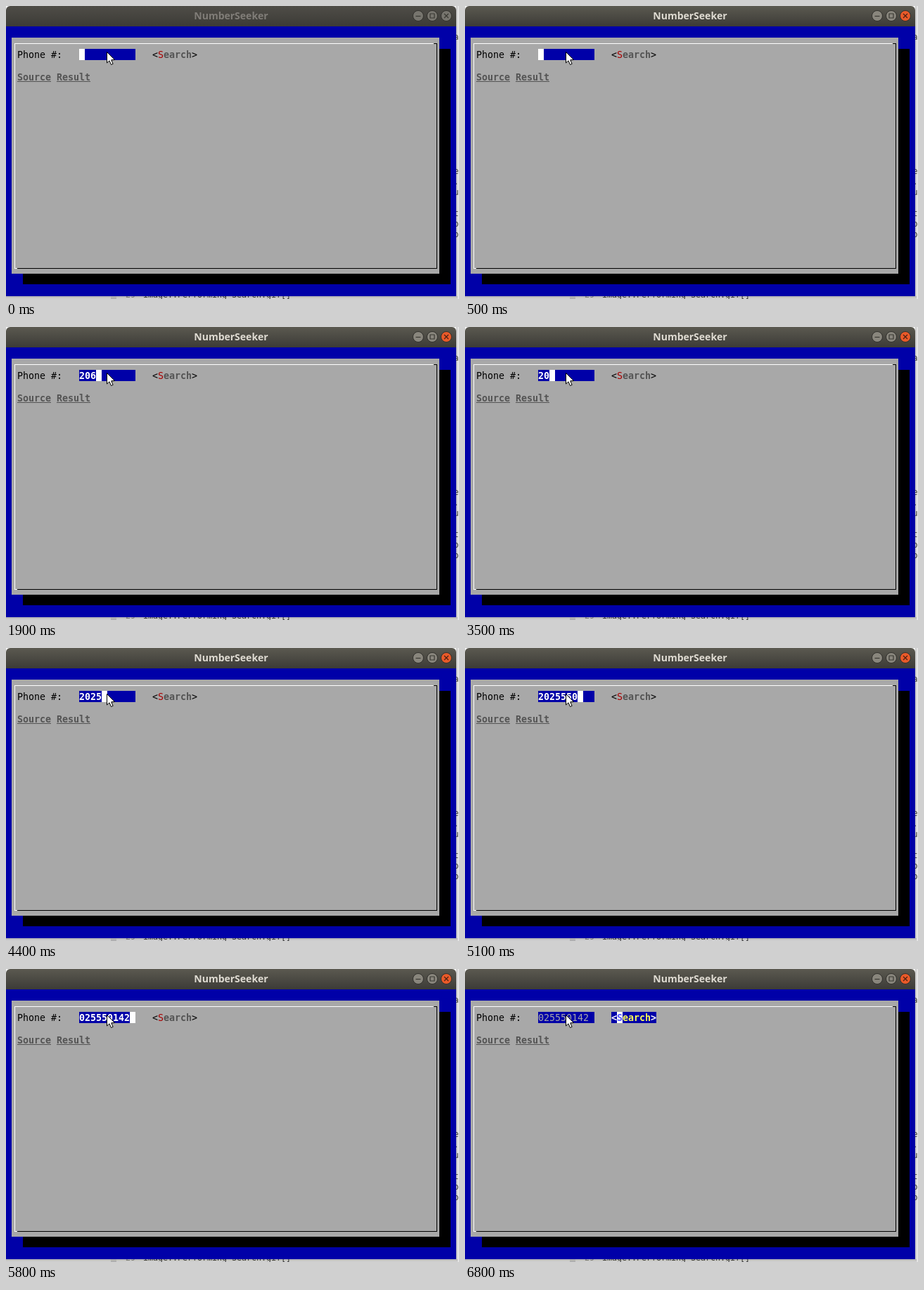
An HTML page with a canvas that plays this animation: 644x417 px, repeating every 8 s.

```html
<!DOCTYPE html>
<html lang="en">
<head>
<meta charset="utf-8">
<title>NumberSeeker</title>
<style>
html, body { margin: 0; width: 100%; height: 100%; overflow: hidden; background: #fff; }
canvas { display: block; }
</style>
</head>
<body>
<canvas id="stage" width="644" height="417"></canvas>
<script>
const ctx = document.getElementById('stage').getContext('2d');
const LOOP = 8000, FOCUS_WINDOW = 500, FOCUS_BUTTON = 6800;
const CELL_W = 8, CELL_H = 16, TOP = 29, FIELD_COL = 13, FIELD_LEN = 10;
const BLUE = '#0000a8', GRAY = '#a8a8a8', DIM = '#545454';
const MONO = '"DejaVu Sans Mono", monospace';

const NUMBER = '2025550142';
// [time, typed text]: one wrong digit is erased before going on
const TYPING = [
  [0, ''], [1500, '2'], [1600, '20'], [1900, '206'], [3500, '20'],
  ...[3600, 4400, 4700, 4800, 5100, 5300, 5600, 5800]
    .map((time, i) => [time, NUMBER.slice(0, i + 3)])
];

function rect(x, y, w, h, color) {
  ctx.fillStyle = color;
  ctx.fillRect(x, y, w, h);
}

function cells(col, row, count, color) {
  rect(col * CELL_W, TOP + row * CELL_H, count * CELL_W, CELL_H, color);
}

function term(text, col, row, color, bold) {
  ctx.font = (bold ? 'bold ' : '') + '13.333px ' + MONO;
  ctx.textAlign = 'left';
  ctx.fillStyle = color;
  [...text].forEach((ch, i) =>
    ctx.fillText(ch, (col + i) * CELL_W, TOP + row * CELL_H + 13));
}

function drawBackdrop() {
  rect(0, 0, 644, 417, '#f4f4f4');
  const side = ctx.createLinearGradient(640, 0, 644, 0);
  side.addColorStop(0, '#c4c4c4');
  side.addColorStop(1, '#eeeeee');
  rect(640, 0, 4, 417, side);
  const below = ctx.createLinearGradient(0, 413, 0, 417);
  below.addColorStop(0, '#b4b4b4');
  below.addColorStop(1, '#d4d4d4');
  rect(0, 413, 642, 4, below);
  rect(149, 413, 8, 4, '#b0b0b0');

  ctx.font = '11.63px ' + MONO;
  ctx.textAlign = 'left';
  ctx.fillStyle = '#333';
  for (const [ch, y] of [['a', 48], ['e', 239], ['.', 254], ['u', 269], ['t', 299], ['o', 314], ['o', 329]])
    ctx.fillText(ch, 636.5, y);
  ctx.fillText('image::Performing Search.gif[]', 195, 415);
  ctx.fillStyle = '#777';
  ctx.fillText('29', 170, 415);
}

function drawButton(x, kind, active) {
  const close = kind === 'close' && active;
  ctx.beginPath();
  ctx.arc(x, 14, 7.5, 0, Math.PI * 2);
  ctx.fillStyle = close ? '#ea5a29' : active ? '#89867d' : '#77756e';
  ctx.fill();
  ctx.strokeStyle = '#32312d';
  ctx.lineWidth = 1;
  ctx.stroke();
  ctx.strokeStyle = close ? '#4b2013' : '#393832';
  ctx.lineWidth = 1.2;
  ctx.beginPath();
  if (kind === 'min') {
    ctx.moveTo(x - 3.5, 14.5);
    ctx.lineTo(x + 3.5, 14.5);
  } else if (kind === 'max') {
    ctx.rect(x - 3, 11, 6, 6);
  } else {
    for (const d of [-1, 1]) {
      ctx.moveTo(x - 3, 14 - 3 * d);
      ctx.lineTo(x + 3, 14 + 3 * d);
    }
  }
  ctx.stroke();
}

function drawTitleBar(active) {
  const shade = ctx.createLinearGradient(0, 0, 0, TOP);
  shade.addColorStop(0, active ? '#5b5950' : '#4f4d47');
  shade.addColorStop(1, '#3c3b37');
  ctx.beginPath();
  ctx.moveTo(0, TOP);
  ctx.lineTo(0, 6);
  ctx.arcTo(0, 0, 6, 0, 6);
  ctx.lineTo(634, 0);
  ctx.arcTo(640, 0, 640, 6, 6);
  ctx.lineTo(640, TOP);
  ctx.fillStyle = shade;
  ctx.fill();

  ctx.font = 'bold 14px "Noto Sans", "Open Sans", sans-serif';
  ctx.textAlign = 'center';
  ctx.fillStyle = active ? '#dfdbd2' : '#807d78';
  ctx.fillText('NumberSeeker', 320, 19);
  ['min', 'max', 'close'].forEach((kind, i) => drawButton(586 + 20 * i, kind, active));
}

function drawDialog() {
  rect(0, TOP, 640, 384, BLUE);
  rect(24, 61, 608, 335, '#000');
  rect(8, 45, 608, 336, GRAY);
  rect(12, 53, 596, 1, '#fff');
  rect(12, 53, 1, 321, '#fff');
  rect(12, 373, 4, 1, '#fff');
  rect(608, 53, 5, 1, '#000');
  rect(612, 53, 1, 321, '#000');
  rect(16, 373, 597, 1, '#000');

  term('Phone #:', 2, 2, '#000');
  for (const [text, col] of [['Source', 2], ['Result', 9]]) {
    term(text, col, 4, DIM, true);
    rect(col * CELL_W, 107, text.length * CELL_W, 1, DIM);
  }
}

function drawField(text, focused) {
  const shown = text.slice(-(FIELD_LEN - 1));
  cells(FIELD_COL, 2, FIELD_LEN, BLUE);
  term(shown, FIELD_COL, 2, focused ? '#fff' : GRAY, focused);
  if (focused && text.length <= NUMBER.length) cells(FIELD_COL + shown.length, 2, 1, '#fff');
}

function drawSearch(focused) {
  if (focused) {
    cells(26, 2, 8, BLUE);
    cells(27, 2, 1, '#fff');
  }
  term('<', 26, 2, focused ? '#fff' : '#000', focused);
  term('S', 27, 2, focused ? '#5454ff' : '#a80000', focused);
  term('earch', 28, 2, focused ? '#ffff54' : DIM, true);
  term('>', 33, 2, focused ? '#fff' : '#000', focused);
}

function drawPointer() {
  const shape = [[0, 0], [0, 15.5], [3.5, 12.3], [6, 18], [8.6, 16.9], [6.2, 11.3], [11, 11.1]];
  ctx.beginPath();
  shape.forEach(([x, y]) => ctx.lineTo(143.5 + x, 65.5 + y));
  ctx.closePath();
  ctx.fillStyle = '#fff';
  ctx.fill();
  ctx.strokeStyle = '#000';
  ctx.lineWidth = 1;
  ctx.lineJoin = 'round';
  ctx.stroke();
}

function draw(time) {
  const typed = TYPING.filter(([start]) => start <= time).pop()[1];
  const onButton = time >= FOCUS_BUTTON;
  drawBackdrop();
  drawTitleBar(time >= FOCUS_WINDOW);
  drawDialog();
  drawField(typed, !onButton);
  drawSearch(onButton);
  drawPointer();
}

const begin = performance.now();
function tick() {
  draw((performance.now() - begin) % LOOP);
  requestAnimationFrame(tick);
}
tick();
</script>
</body>
</html>
```
